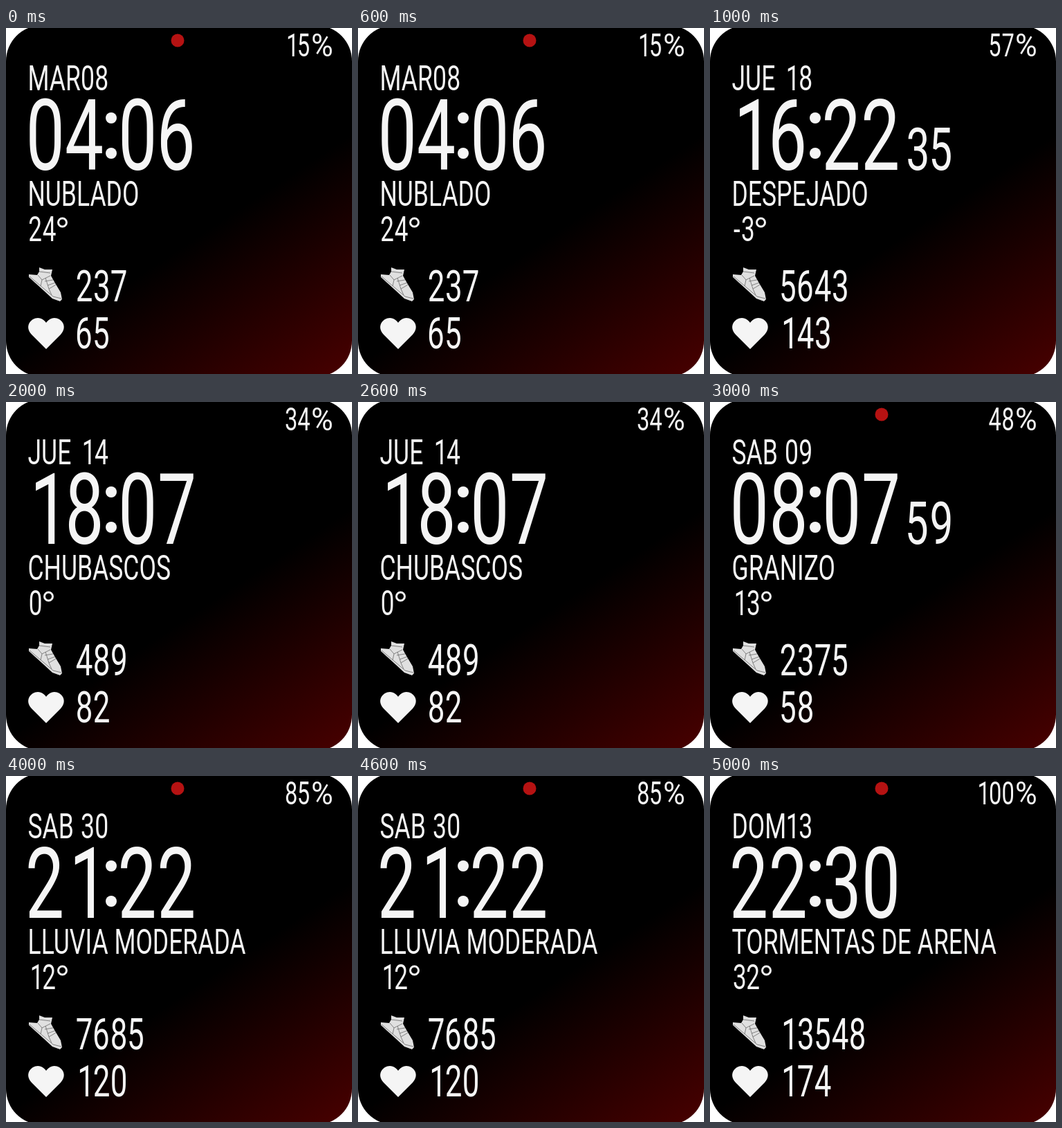
An HTML page with a canvas for the animation above (6 s loop, 500x500 px).

```html
<!DOCTYPE html>
<html lang="es">
<head>
<meta charset="utf-8">
<title>Esfera de reloj</title>
<style>
  html, body { margin: 0; width: 100%; height: 100%; overflow: hidden; background: #fff; }
  canvas { display: block; }
</style>
</head>
<body>
<canvas id="face" width="500" height="500"></canvas>
<script>
const ctx = document.getElementById('face').getContext('2d');
const INK = '#f5f5f5';
const CONDENSE = 0.702;  // horizontal ratio of all condensed type
const DIGIT_CELL = 0.4;  // digit advance in em
const MINUS_CELL = 0.24;

const readings = [
  { day: 'MAR', date: '08', hour: '04', minute: '06', weather: 'NUBLADO', temp: '24', steps: '237', pulse: '65', battery: '15', dot: true },
  { day: 'JUE', date: '18', hour: '16', minute: '22', second: '35', weather: 'DESPEJADO', temp: '-3', steps: '5643', pulse: '143', battery: '57' },
  { day: 'JUE', date: '14', hour: '18', minute: '07', weather: 'CHUBASCOS', temp: '0', steps: '489', pulse: '82', battery: '34' },
  { day: 'SAB', date: '09', hour: '08', minute: '07', second: '59', weather: 'GRANIZO', temp: '13', steps: '2375', pulse: '58', battery: '48', dot: true },
  { day: 'SAB', date: '30', hour: '21', minute: '22', weather: 'LLUVIA MODERADA', temp: '12', steps: '7685', pulse: '120', battery: '85', dot: true },
  { day: 'DOM', date: '13', hour: '22', minute: '30', weather: 'TORMENTAS DE ARENA', temp: '32', steps: '13548', pulse: '174', battery: '100', dot: true }
];

const heart = new Path2D('M58 464L37 443C26 431 36 419 46 419C52 419 56 423 58 426C60 423 64 419 70 419C80 419 90 431 79 443Z');
const shoe = new Path2D('M48 346L56 349L67 349L65 358L70 367L79 382L81 392L78 395L67 391L54 379L33 360L33 356L45 357L48 352Z');
const seams = new Path2D('M34 359L54 376L68 388L80 391M46 357L52 364L64 358M52 364L50 373M57 361L62 377L72 371M62 377L66 386M48 352L64 354M56 366L68 364M60 372L71 368');

const backdrop = ctx.createLinearGradient(225, 336, 384, 575);
backdrop.addColorStop(0, '#000');
backdrop.addColorStop(1, '#480000');

function write(text, x, y, size, ratio = CONDENSE) {
  ctx.save();
  ctx.translate(x, y);
  ctx.scale(ratio, 1);
  ctx.font = `${size}px Roboto, sans-serif`;
  ctx.fillStyle = INK;
  ctx.fillText(text, 0, 0);
  ctx.restore();
}

// Centres the ink of each digit in its cell and returns the x where the row ends.
function writeNumber(text, x, y, size) {
  for (const char of text) {
    const cell = size * (char === '-' ? MINUS_CELL : DIGIT_CELL);
    ctx.font = `${size}px Roboto, sans-serif`;
    const ink = ctx.measureText(char);
    const centre = (ink.actualBoundingBoxRight - ink.actualBoundingBoxLeft) / 2;
    write(char, x + cell / 2 - centre * CONDENSE, y, size);
    x += cell;
  }
  return x;
}

function disc(x, y, radius, color) {
  ctx.fillStyle = color;
  ctx.beginPath();
  ctx.arc(x, y, radius, 0, 2 * Math.PI);
  ctx.fill();
}

function drawIcons() {
  ctx.fillStyle = INK;
  ctx.fill(heart);
  ctx.fillStyle = '#e0e0e0';
  ctx.fill(shoe);
  ctx.strokeStyle = '#777';
  ctx.lineWidth = 0.9;
  ctx.stroke(seams);
}

function drawTemperature(temp) {
  const end = writeNumber(temp, 32.5, 308, 50);
  ctx.strokeStyle = INK;
  ctx.lineWidth = 3;
  ctx.beginPath();
  ctx.arc(end + 9, 281, 6, 0, 2 * Math.PI);
  ctx.stroke();
}

function drawBattery(level) {
  const size = 46.5;
  writeNumber(level, 440 - level.length * size * DIGIT_CELL, 41, size);
  write('%', 441, 41, size, 0.93);
}

function draw(r) {
  ctx.fillStyle = '#fff';
  ctx.fillRect(0, 0, 500, 500);
  ctx.fillStyle = backdrop;
  ctx.beginPath();
  ctx.roundRect(0, -4, 500, 508, 52);
  ctx.fill();

  if (r.dot) disc(248, 18, 9.5, '#b51212');
  drawBattery(r.battery);

  write(r.day, 31.5, 90, 50.6);
  writeNumber(r.date, 107.8, 90, 50.6);

  writeNumber(r.hour, 28, 204.5, 142);
  disc(152, 130, 8, INK);
  disc(152, 181, 8, INK);
  writeNumber(r.minute, 161.5, 204.5, 142);
  if (r.second) writeNumber(r.second, 282.5, 204.5, 86);

  write(r.weather, 31.5, 257, 50.6);
  drawTemperature(r.temp);

  drawIcons();
  writeNumber(r.steps, 100.5, 395, 62.5);
  writeNumber(r.pulse, 100.5, 463, 62.5);
}

function tick() {
  draw(readings[Math.floor(performance.now() / 1000) % readings.length]);
  requestAnimationFrame(tick);
}
tick();
</script>
</body>
</html>
```
